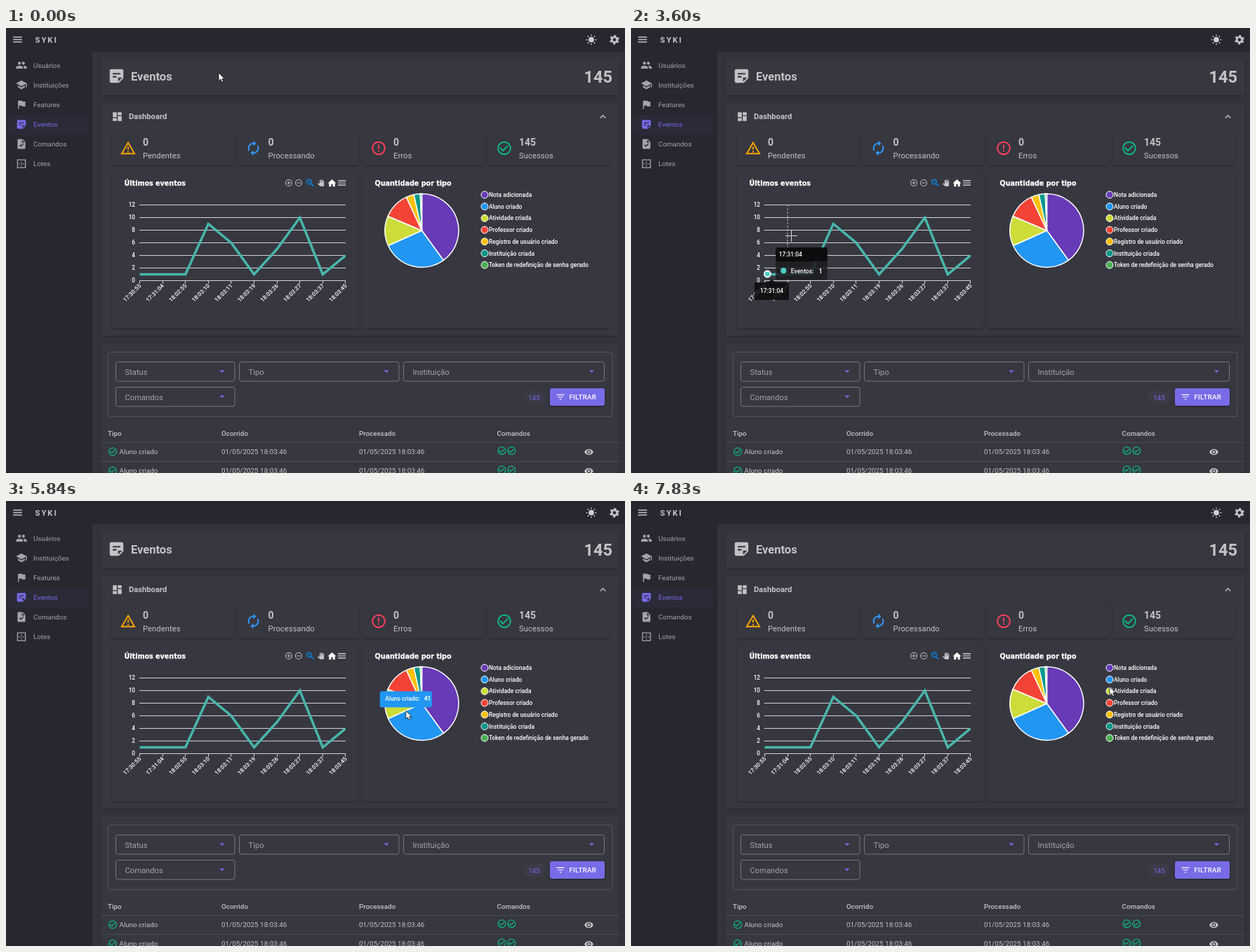
Recreate the animation shown at these times as an HTML page. Size 882x635 px, loop 8 s.

```html
<!DOCTYPE html>
<html lang="pt-BR">
<head>
<meta charset="utf-8">
<title>Eventos</title>
<style>
html, body { margin: 0; width: 100%; height: 100%; overflow: hidden; background: #32333d; }
svg { display: block; width: 882px; height: 635px; font: 400 9.8px Roboto, sans-serif; fill: #c3c3c6; }
text { white-space: pre; }
.paper { fill: #373740; filter: drop-shadow(0 1.4px 1.3px rgba(0, 0, 0, .32)); }
.outline { fill: none; stroke: #75757d; }
.crisp { shape-rendering: crispEdges; }
.chart { font-size: 8.4px; font-weight: 500; fill: #fff; }
.heading { font: 700 9.6px "DejaVu Sans", sans-serif; fill: #fff; stroke: #fff; stroke-width: .25px; }
</style>
</head>
<body>
<svg id="stage" viewBox="0 0 882 635"></svg>
<script>
const stage = document.getElementById('stage');
const PRIMARY = '#776be7', GREEN = '#0bba83', MUTED = '#a3a3a9', TEAL = '#4ecdc4';

const ICONS = {
  menu: 'M3 18h18v-2H3v2zm0-5h18v-2H3v2zm0-7v2h18V6H3z',
  people: 'M16 11c1.66 0 2.99-1.34 2.99-3S17.66 5 16 5c-1.66 0-3 1.34-3 3s1.34 3 3 3zm-8 0c1.66 0 2.99-1.34 2.99-3S9.66 5 8 5C6.34 5 5 6.34 5 8s1.34 3 3 3zm0 2c-2.33 0-7 1.17-7 3.5V19h14v-2.5c0-2.33-4.67-3.5-7-3.5zm8 0c-.29 0-.62.02-.97.05 1.16.84 1.97 1.97 1.97 3.45V19h6v-2.5c0-2.33-4.67-3.5-7-3.5z',
  school: 'M5 13.18v4L12 21l7-3.82v-4L12 17l-7-3.82zM12 3L1 9l11 6 9-4.91V17h2V9L12 3z',
  flag: 'M14.4 6L14 4H5v17h2v-7h5.6l.4 2h7V6z',
  note: 'M19 3H4.99C3.89 3 3 3.9 3 5l.01 14c0 1.1.89 2 1.99 2h10l6-6V5c0-1.1-.9-2-2-2zM7 8h10v2H7V8zm5 6H7v-2h5v2zm2 5.5V14h5.5L14 19.5z',
  task: 'M14 2H6c-1.1 0-1.99.9-1.99 2L4 20c0 1.1.89 2 1.99 2H18c1.1 0 2-.9 2-2V8l-6-6zm-3.06 16L7.4 14.46l1.41-1.41 2.12 2.12 4.24-4.24 1.41 1.41L10.94 18zM13 9V3.5L18.5 9H13z',
  batch: 'M13 7h-2v2h2V7zm0 4h-2v2h2v-2zm4 0h-2v2h2v-2zM3 3v18h18V3H3zm16 16H5V5h14v14zm-6-4h-2v2h2v-2zm-4-4H7v2h2v-2z',
  dashboard: 'M3 13h8V3H3v10zm0 8h8v-6H3v6zm10 0h8V11h-8v10zm0-18v6h8V3h-8z',
  warning: 'M12 5.99L19.53 19H4.47L12 5.99M12 2L1 21h22L12 2zm1 14h-2v2h2v-2zm0-6h-2v4h2v-4z',
  sync: 'M12 6v3l4-4-4-4v3c-4.42 0-8 3.58-8 8 0 1.57.46 3.03 1.24 4.26L6.7 14.8c-.45-.83-.7-1.79-.7-2.8 0-3.31 2.69-6 6-6zm6.76 1.74L17.3 9.2c.44.84.7 1.79.7 2.8 0 3.31-2.69 6-6 6v-3l-4 4 4 4v-3c4.42 0 8-3.58 8-8 0-1.57-.46-3.03-1.24-4.26z',
  error: 'M11 15h2v2h-2zm0-8h2v6h-2zm1-5a10 10 0 100 20 10 10 0 000-20zm0 18a8 8 0 110-16 8 8 0 010 16z',
  check: 'M16.59 7.58L10 14.17l-3.59-3.58L5 12l5 5 8-8zM12 2a10 10 0 100 20 10 10 0 000-20zm0 18a8 8 0 110-16 8 8 0 010 16z',
  collapse: 'M12 8l-6 6 1.41 1.41L12 10.83l4.59 4.58L18 14z',
  dropdown: 'M7 10l5 5 5-5z',
  filter: 'M10 18h4v-2h-4v2zM3 6v2h18V6H3zm3 7h12v-2H6v2z',
  eye: 'M12 4.5C7 4.5 2.73 7.61 1 12c1.73 4.39 6 7.5 11 7.5s9.27-3.11 11-7.5c-1.73-4.39-6-7.5-11-7.5zM12 17a5 5 0 110-10 5 5 0 010 10zm0-8a3 3 0 100 6 3 3 0 000-6z',
  plus: 'M13 7h-2v4H7v2h4v4h2v-4h4v-2h-4V7zm-1-5a10 10 0 100 20 10 10 0 000-20zm0 18a8 8 0 110-16 8 8 0 010 16z',
  minus: 'M7 11v2h10v-2H7zm5-9a10 10 0 100 20 10 10 0 000-20zm0 18a8 8 0 110-16 8 8 0 010 16z',
  zoom: 'M15.5 14h-.79l-.28-.27A6.5 6.5 0 109.5 16c1.61 0 3.09-.59 4.23-1.57l.27.28v.79l5 4.99L20.49 19l-4.99-5zm-6 0a4.5 4.5 0 110-9 4.5 4.5 0 010 9zM9 7v2H7v1h2v2h1v-2h2V9h-2V7z',
  hand: 'M23 5.5V20c0 2.2-1.8 4-4 4h-7.3c-1.08 0-2.1-.43-2.85-1.19L1 14.83s1.26-1.23 1.3-1.25c.22-.19.49-.29.79-.29.22 0 .42.06.6.16L8 15.91V4c0-.83.67-1.5 1.5-1.5S11 3.17 11 4v7h1V1.5c0-.83.67-1.5 1.5-1.5S15 .67 15 1.5V11h1V2.5c0-.83.67-1.5 1.5-1.5s1.5.67 1.5 1.5V11h1V5.5c0-.83.67-1.5 1.5-1.5s1.5.67 1.5 1.5z',
  home: 'M10 20v-6h4v6h5v-8h3L12 3 2 12h3v8z'
};

const icon = (name, cx, cy, scale = .7, fill = '#c3c3c6') =>
  `<path d="${ICONS[name]}" fill="${fill}" transform="translate(${cx} ${cy}) scale(${scale}) translate(-12 -12)"/>`;
const text = (x, y, content, attrs = '') => `<text x="${x}" y="${y}" ${attrs}>${content}</text>`;
const rect = (x, y, w, h, attrs = '', r = 3) =>
  `<rect x="${x}" y="${y}" width="${w}" height="${h}" rx="${r}" ${attrs}/>`;
const paper = (x, y, w, h) => rect(x, y, w, h, 'class="paper"');
const line = (x1, y1, x2, y2, attrs) => `<path d="M${x1} ${y1}L${x2} ${y2}" ${attrs}/>`;

// Chart data
const TIMES = ['17:30:55', '17:31:04', '18:02:55', '18:03:10', '18:03:11', '18:03:19', '18:03:26', '18:03:27', '18:03:37', '18:03:45'];
const VALUES = [1, 1, 1, 9, 6, 1, 5, 10, 1, 4];
const points = VALUES.map((v, i) => ({ x: 190.5 + i * 32.6, y: 360 - 9 * v }));
const PIE = { x: 592.5, y: 289, r: 52.5 };
const SLICES = [
  ['Nota adicionada', 58, '#673ab7'], ['Aluno criado', 41, '#2196f3'], ['Atividade criada', 19, '#cddc39'],
  ['Professor criado', 17, '#f44336'], ['Registro de usuário criado', 5, '#ffc107'],
  ['Instituição criada', 4, '#009688'], ['Token de redefinição de senha gerado', 1, '#4caf50']
].reduce((list, [label, count, color]) => {
  const start = list.length ? list[list.length - 1].end : 0;
  return [...list, { label, count, color, start, end: start + count / 145 }];
}, []);

function shell() {
  const nav = [['people', 'Usuários'], ['school', 'Instituições'], ['flag', 'Features'], ['note', 'Eventos'], ['task', 'Comandos'], ['batch', 'Lotes']];
  return rect(0, 0, 123, 635, 'fill="#27272f"', 0) + rect(0, 0, 882, 33.5, 'fill="#27272f"', 0) +
    icon('menu', 16.5, 16.5) +
    text(41.5, 20.5, 'SYKI', 'font-size="11.2" font-weight="700" letter-spacing="2"') +
    `<g transform="translate(834 16.7)" fill="#d0d0d3" stroke="#d0d0d3" stroke-width="1.5"><circle r="3.1"/>` +
    [0, 45, 90, 135, 180, 225, 270, 315].map(a => `<path d="M0-5.5V-7.3" transform="rotate(${a})"/>`).join('') + '</g>' +
    `<g transform="translate(867 16.7) rotate(17)" fill="none" stroke="#c3c3c6"><circle r="3.7" stroke-width="2.8"/>
      <circle r="5.6" stroke-width="2.4" stroke-dasharray="2.9 2.964"/></g>` +
    rect(3, 124, 114, 28, 'fill="#2b2a38"') +
    nav.map(([name, label], i) => {
      const y = 53 + i * 28.15, color = i === 3 ? PRIMARY : MUTED;
      return icon(name, 22, y, .7, color) + text(39, y + 3.5, label, `fill="${color}"`);
    }).join('');
}

function header() {
  const cards = [[151, 'warning', '#ffa800', 0, 'Pendentes'], [329.5, 'sync', '#3299ff', 0, 'Processando'],
    [508, 'error', '#ff3f5f', 0, 'Erros'], [687, 'check', GREEN, 145, 'Sucessos']];
  return paper(134.5, 44, 740, 52) + icon('note', 157.5, 68.5, 1.08) +
    text(178, 75, 'Eventos', 'font-size="16.5" font-weight="700"') +
    text(864, 78, 145, 'font-size="23.6" font-weight="700" text-anchor="end"') +
    paper(134.5, 108, 740, 331) + icon('dashboard', 158.5, 126.5) +
    text(175, 130, 'Dashboard', 'font-size="11.2" font-weight="700"') + icon('collapse', 850.5, 126.5) +
    cards.map(([x, name, color, count, label]) => paper(x, 148, 173, 48) + icon(name, x + 23, 171.5, .98, color) +
      text(x + 44, 167.5, count, 'font-size="14" font-weight="700"') +
      text(x + 44, 186, label, 'font-size="11.2" letter-spacing=".08"')).join('');
}

function lineChart() {
  const grid = [0, 2, 4, 6, 8, 10, 12].map(v => {
    const y = 360 - 9 * v;
    return line(190, y + .5, 484, y + .5, 'class="crisp" stroke="#d2d2d6"') +
      text(184, y + 3, v, 'text-anchor="end" font-size="8.2"');
  }).join('');
  const labels = points.map(({ x }, i) => line(x, 360, x, 365, 'class="crisp" stroke="#d2d2d6"') +
    `<text transform="translate(${x + 2.5} 368.5) rotate(-45)" text-anchor="end" font-size="8.2">${TIMES[i]}</text>`).join('');
  return paper(151, 206, 351, 222.5) + text(168.5, 224.5, 'Últimos eventos', 'class="heading"') +
    icon('plus', 403, 221, .5) + icon('minus', 417, 221, .5) + icon('zoom', 433.5, 221, .62, '#008ffb') +
    icon('hand', 448.5, 221, .42) + icon('home', 464.5, 221.5, .6, '#fff') + icon('menu', 478.5, 221, .62, '#e6e6e8') +
    `<g class="chart">${grid}${labels}</g>` +
    `<clipPath id="plot"><rect x="190" y="245" width="294" height="120"/></clipPath>
     <polyline points="${points.map(p => p.x + ',' + p.y)}" fill="none" stroke="#48b6ab" stroke-width="3.5" clip-path="url(#plot)" transform="translate(0 .5)"/>`;
}

function pieChart() {
  const rim = turn => `${PIE.x + PIE.r * Math.sin(turn * 2 * Math.PI)} ${PIE.y - PIE.r * Math.cos(turn * 2 * Math.PI)}`;
  return paper(507.5, 206, 352.5, 222.5) + text(525.5, 224.5, 'Quantidade por tipo', 'class="heading"') +
    SLICES.map(s => `<path d="M${PIE.x} ${PIE.y}L${rim(s.start)}A${PIE.r} ${PIE.r} 0 0 1 ${rim(s.end)}Z" fill="${s.color}" stroke="#fff" stroke-width="1.5"/>`).join('') +
    SLICES.map((s, i) => {
      const y = 238 + 16.7 * i;
      return `<circle cx="682" cy="${y}" r="5" fill="${s.color}" stroke="#fff"/>` +
        text(688, y + 3, s.label, 'class="chart"');
    }).join('');
}

function eventTable() {
  const selects = [[156.5, 476.5, 169.5, 'Status'], [332.5, 476.5, 227.5, 'Tipo'], [566.5, 476.5, 286, 'Instituição'], [156.5, 512.5, 169.5, 'Comandos']];
  const columns = [[145, 'Tipo'], [307, 'Ocorrido'], [503, 'Processado'], [699.5, 'Comandos']];
  const row = y => icon('check', 152, y + .5, .6, GREEN) + text(161.5, y + 4, 'Aluno criado') +
    [307, 503].map(x => text(x, y + 4, '01/05/2025 18:03:46', 'letter-spacing=".05"')).join('') +
    [706.5, 720.3].map(x => icon('check', x, y - .8, .6, GREEN)).join('') + icon('eye', 830.5, y + 1, .58);
  return paper(134.5, 450, 740, 200) + rect(145.5, 462.5, 718.5, 92, 'fill="none" stroke="#55555f"') +
    selects.map(([x, y, w, label]) => rect(x, y, w, 27.5, 'class="outline"') +
      text(x + 13, y + 18.5, label, `font-size="11.2" fill="${MUTED}"`) +
      icon('dropdown', x + w - 18, y + 13.5, .7, PRIMARY)).join('') +
    rect(737, 517.5, 31, 18.5, 'fill="#3c3b49"', 9) + text(752.5, 530.5, 145, `fill="${PRIMARY}" text-anchor="middle"`) +
    rect(775, 514, 78, 25, `fill="${PRIMARY}" style="filter:drop-shadow(0 1.5px 1.5px #0006)"`) +
    icon('filter', 790, 526.5, .62, '#fff') +
    text(802.5, 529.7, 'FILTRAR', 'fill="#fff" font-weight="500" letter-spacing=".18"') +
    columns.map(([x, label]) => text(x, 581.5, label, 'font-weight="500"')).join('') +
    [591.5, 618.5].map(y => line(134.5, y, 874.5, y, 'stroke="#4b4b55"')).join('') +
    row(604) + row(631.3);
}

stage.innerHTML = shell() + header() + lineChart() + pieChart() + eventTable() + `
  <g id="hover" class="chart">
    <path id="guide" stroke="#b6b6b6" stroke-dasharray="3 2"/>
    <circle id="marker" r="4.5" fill="${TEAL}" stroke="#fff" stroke-width="1.8"/>
    <g id="axisTip">
      <path d="M2 363H19.5L24.5 358.5 29.5 363H47Q49 363 49 365V386Q49 388 47 388H2Q0 388 0 386V365Q0 363 2 363Z" fill="#0b0b0d" fill-opacity=".86"/>
      <text id="axisTime" x="24.5" y="377.5" text-anchor="middle"></text>
    </g>
    <g id="tip">
      <rect id="tipBody" height="46" rx="3" fill="#1c1c20" fill-opacity=".86"/>
      <rect id="tipHead" height="20" rx="3" fill="#09090b" fill-opacity=".85"/>
      <text id="tipTime" x="4.5" y="13"></text>
      <circle cx="11" cy="33" r="4.2" fill="${TEAL}"/>
      <text x="21.5" y="36.3" font-size="8.6">Eventos:</text>
      <text id="tipValue" x="61.5" y="36.3" font-weight="700"></text>
    </g>
  </g>
  <g id="pieTip" class="chart">
    <rect id="pieBox" height="23" rx="3"/>
    <text x="7.5" y="13.8"><tspan id="pieLabel"></tspan><tspan id="pieValue" dx="6" font-weight="700"></tspan></text>
  </g>
  <path id="arrow" d="M0 0V11.5L2.7 9 4.5 13 6.6 12.1 4.8 8.2H8.4Z" fill="#fff" stroke="#111" stroke-width=".8"/>
  <path id="cross" class="crisp" d="M-8 .5H9M.5-8V9" stroke="#d8d8da"/>`;

const el = Object.fromEntries([...stage.querySelectorAll('[id]')].map(node => [node.id, node]));
const show = (node, visible) => node.setAttribute('visibility', visible ? 'visible' : 'hidden');
const place = (node, x, y) => node.setAttribute('transform', `translate(${x} ${y})`);
const mix = (a, b, k) => a + (b - a) * k;

// Pointer path: time, x, y
const PATH = [
  [0, 303, 64], [40, 303, 64], [340, 175, 62], [680, 345, 61], [970, 345, 61], [1420, 864, 73], [1560, 850, 72],
  [1700, 624, 70], [1740, 505, 80], [2100, 290, 118], [2550, 245, 158], [2590, 245, 158], [2720, 184, 160],
  [3040, 757, 164], [3360, 393, 247], [3480, 208, 268], [3600, 227.5, 296], [3790, 271, 298], [3890, 304, 300],
  [4190, 369, 304], [4380, 431.5, 306.5], [4460, 434, 310], [4600, 490, 332], [4990, 584, 386], [5030, 590, 384],
  [5300, 586, 335], [5500, 577, 318], [5800, 572, 300], [6100, 556, 296], [6350, 554, 280], [6630, 568.5, 270.5],
  [6900, 586, 268], [7100, 610, 285], [7470, 590, 314], [7550, 586, 323], [7680, 620, 295], [7750, 641, 272],
  [7830, 682, 265.5], [8000, 682, 265.5]
];
// When the pointer reaches each point of the line chart
const ENTER = [3480, 3592, 3660, 3790, 3890, 4040, 4190, 4310, 4470, 4540];
const LEAVE = 4590;

function pointerAt(t) {
  const i = PATH.findIndex(key => key[0] > t);
  const [t0, x0, y0] = PATH[i - 1], [t1, x1, y1] = PATH[i];
  const k = (t - t0) / (t1 - t0);
  return { x: mix(x0, x1, k), y: mix(y0, y1, k) };
}

function drawLineHover(t) {
  const active = t >= ENTER[0] && t < LEAVE;
  show(el.hover, active);
  show(el.cross, active);
  show(el.arrow, !active);
  if (!active) return;
  // Each tooltip part glides for 150 ms and may be redirected on the way
  let pos, index;
  ENTER.forEach((start, i) => {
    if (start > t) return;
    const k = Math.min((Math.min(t, ENTER[i + 1] ?? t) - start) / 150, 1), ease = 1 - (1 - k) ** 2;
    const width = VALUES[i] > 9 ? 77.5 : 73.5;
    const goal = { ...points[i], tip: points[i].x + (i < 5 ? 12 : -3 - width) };
    pos = pos ? { x: mix(pos.x, goal.x, ease), y: mix(pos.y, goal.y, ease), tip: mix(pos.tip, goal.tip, ease) } : goal;
    index = i;
    el.tipBody.setAttribute('width', width);
    el.tipHead.setAttribute('width', width);
  });
  el.guide.setAttribute('d', `M${points[index].x} 252V360`);
  place(el.marker, pos.x, pos.y);
  place(el.axisTip, Math.max(pos.x - 24.5, 176), 0);
  place(el.tip, pos.tip, pos.y - 37.7);
  el.axisTime.textContent = el.tipTime.textContent = TIMES[index];
  el.tipValue.textContent = VALUES[index];
}

function drawPieHover({ x, y }) {
  const dx = x - PIE.x, dy = y - PIE.y;
  const active = Math.hypot(dx, dy) < PIE.r;
  show(el.pieTip, active);
  if (!active) return;
  const turn = (Math.atan2(dx, -dy) / (2 * Math.PI) + 1) % 1;
  const slice = SLICES.find(s => turn < s.end) ?? SLICES[0];
  el.pieLabel.textContent = slice.label + ':';
  el.pieValue.textContent = slice.count;
  const width = el.pieLabel.parentNode.getComputedTextLength() + 15;
  el.pieBox.setAttribute('width', width);
  el.pieBox.setAttribute('fill', slice.color);
  place(el.pieTip, x - width / 2, y - 28);
}

function frame() {
  const t = performance.now() % 8000;
  const pointer = pointerAt(t);
  place(el.arrow, pointer.x, pointer.y);
  place(el.cross, Math.round(pointer.x), Math.round(pointer.y));
  drawLineHover(t);
  drawPieHover(pointer);
  requestAnimationFrame(frame);
}
frame();
</script>
</body>
</html>
```
